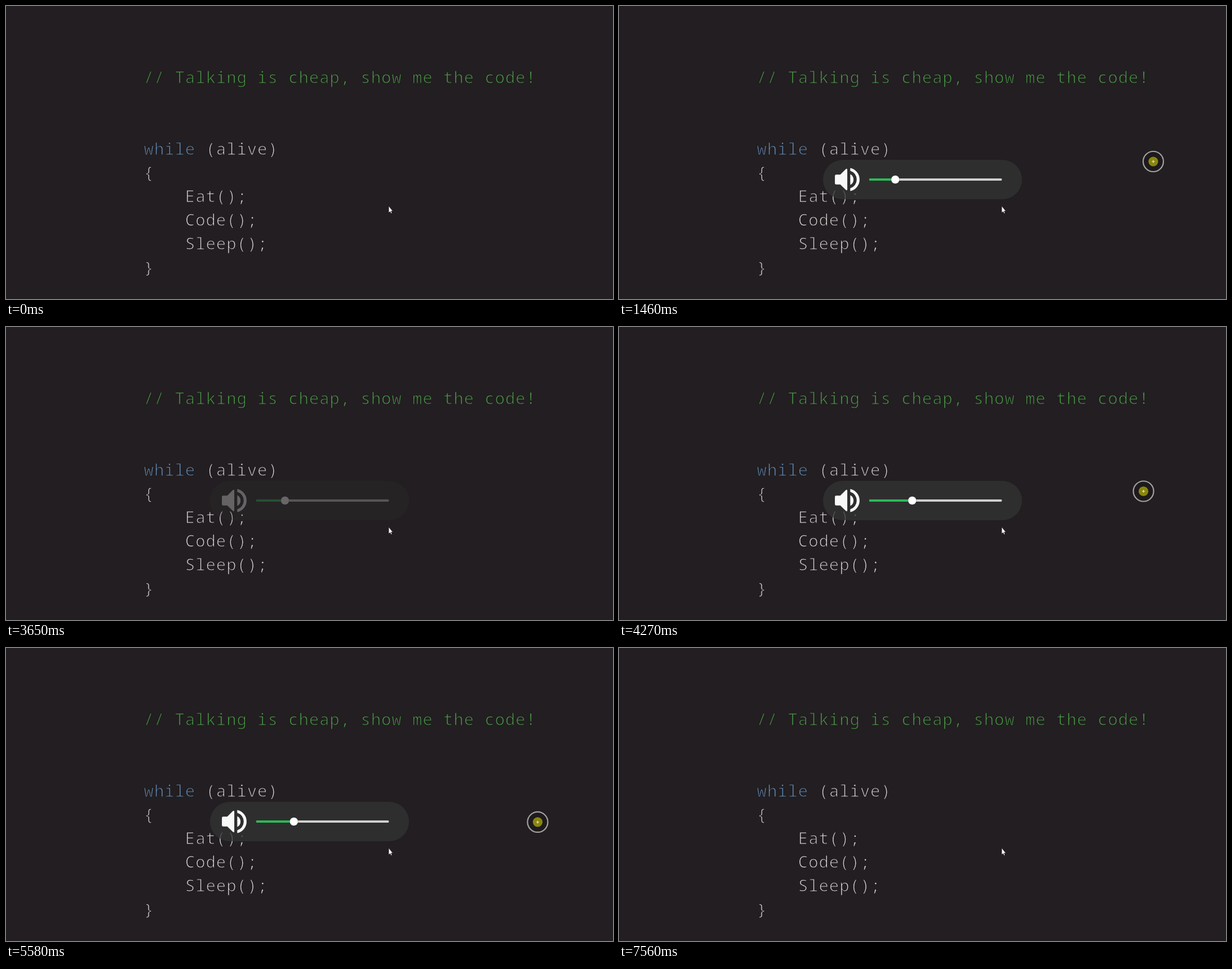
Recreate the animation shown at these times as an HTML page. Size 1077 by 520 pixels, loop 8790 ms.

```html
<!DOCTYPE html>
<html lang="en">
<head>
<meta charset="utf-8">
<title>Volume gesture</title>
<style>
  html, body { margin: 0; width: 100%; height: 100%; overflow: hidden; background: #221e21; }
  svg { display: block; }
  /* The background-coloured outline thins the letters to a light weight */
  text {
    font: 200 29px "Noto Sans Mono", "DejaVu Sans Mono", monospace;
    letter-spacing: .92px;
    white-space: pre;
    fill: #cfcdcd;
    stroke: #221e21;
    stroke-width: 1.1px;
  }
  .comment { fill: #4a9a46; }
  .keyword { fill: #6089b3; }
</style>
</head>
<body>
<svg width="1077" height="520" viewBox="0 0 1077 520">
  <defs>
    <linearGradient id="green" gradientUnits="userSpaceOnUse" x1="444" x2="590" y1="0" y2="0">
      <stop offset="0" stop-color="#2abb55"/>
      <stop offset=".75" stop-color="#2abb55"/>
      <stop offset="1" stop-color="#2abb25"/>
    </linearGradient>
  </defs>

  <g id="code"></g>

  <g id="panel">
    <rect x="362" y="273" width="353" height="70" rx="35" fill="#343434" fill-opacity=".76"/>
    <g transform="translate(375.9 279.3) scale(2.39)" fill="#f8f8fa">
      <path d="M4 8.3Q3 8.3 3 9.3V14.7Q3 15.7 4 15.7H7L11.2 19.8Q12.2 20.4 12.2 19.2V4.8Q12.2 3.6 11.2 4.2L7 8.3Z"/>
      <path d="M14.4 8A4.5 4.5 0 0 1 14.4 16Z"/>
      <path d="M14.4 3.4A8.8 8.8 0 0 1 14.4 20.6V18.5A6.8 6.8 0 0 0 14.4 5.5Z"/>
    </g>
    <rect x="444" y="306" width="235.5" height="4" rx="2" fill="#cfcfcf"/>
    <rect id="level" x="444" y="306" height="4" rx="2" fill="url(#green)"/>
    <circle id="knob" cy="308" r="7.3" fill="#fff" stroke="#222" stroke-opacity=".3" stroke-width=".8"/>
  </g>

  <path d="M679 355V367L681.6 364.8L683.3 368.2L685 367.4L683.4 364H686.4Z"
        fill="#f4f4f4" stroke="#161416" stroke-width=".6"/>

  <g id="touch">
    <circle r="18" fill="#000" fill-opacity=".12" stroke="#a2a2a0" stroke-width="2.2"/>
    <circle r="8.6" fill="#89860f"/>
    <path d="M-2.5 0H2.5M0 -2.5V2.5" stroke="#f0f0d8" stroke-width="1.1"/>
  </g>
</svg>
<script>
const LOOP = 8790, STEP = 76.5;
const el = id => document.getElementById(id);
const clamp = v => Math.max(0, Math.min(1, v));
const ramp = (t, from, to) => clamp((t - from) / (to - from));
const easeOut = k => 1 - (1 - k) ** 1.75;

// Code lines, spaced evenly; row 0 is the loop header
const addLine = (row, html, cls = "") =>
  `<text x="244.6" y="${263.5 + row * 42.2}" class="${cls}">${html}</text>`;
el("code").innerHTML =
  addLine(-3, "// Talking is cheap, show me the code!", "comment") +
  ["<tspan class='keyword'>while</tspan> (alive)", "{", "    Eat();", "    Code();", "    Sleep();", "}"]
    .map((line, row) => addLine(row, line)).join("");

// Each drag lists where the finger turns: time, finger x and y, knob x
const drags = [
  [{ t: 1000, x: 915, y: 300, knob: 446 },
   { t: 1840, x: 959, y: 268, knob: 505 },
   { t: 2080, x: 957, y: 273, knob: 495 }],
  [{ t: 4110, x: 926, y: 304, knob: 495 },
   { t: 4980, x: 942, y: 260.5, knob: 583 },
   { t: 5810, x: 943.5, y: 315.5, knob: 501 }],
];

function pose([down, turn, up], t) {
  const [a, b] = t < turn.t ? [down, turn] : [turn, up];
  const k = easeOut(ramp(t, a.t, b.t));
  const mix = key => a[key] + (b[key] - a[key]) * k;
  return { x: mix("x"), y: mix("y"), knob: mix("knob") };
}

function draw(time) {
  const now = time % LOOP;
  const drag = drags[now < drags[1][0].t ? 0 : 1];
  const start = drag[0].t, end = drag[2].t;
  const t = start + Math.floor((now - start) / STEP) * STEP;
  const { x, y, knob } = pose(drag, t);

  // Both parts fade in on touch; the panel lingers after release
  const panel = ramp(t, start, start + 150) - ramp(t, end + 1200, end + 1670);
  const touch = t < start ? 0 : ramp(t, start - 70, start + 80) - ramp(t, end + 60, end + 290);
  el("panel").setAttribute("opacity", panel);
  el("touch").setAttribute("opacity", touch);
  el("touch").setAttribute("transform", `translate(${x} ${y})`);
  el("knob").setAttribute("cx", knob);
  el("level").setAttribute("width", knob - 444);
}

const begin = performance.now();
function tick() {
  draw(performance.now() - begin);
  requestAnimationFrame(tick);
}
tick();
</script>
</body>
</html>
```
